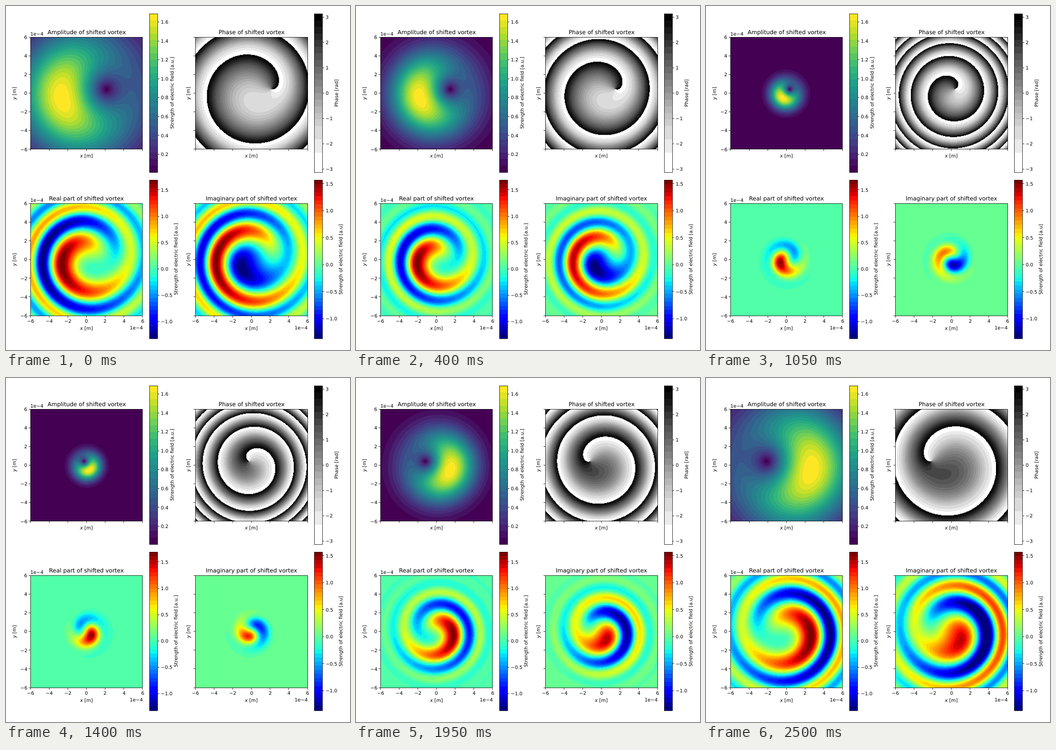
These frames come from a looping animation (720 px wide and 720 px high, 2550 ms). An HTML page with a canvas:

```html
<!DOCTYPE html>
<html lang="en">
<head>
<meta charset="utf-8">
<title>Shifted vortex</title>
<style>
  html, body { margin: 0; width: 100%; height: 100%; overflow: hidden; background: #fff; }
  canvas { display: block; width: 720px; height: 720px; }
</style>
</head>
<body>
<canvas id="stage" width="720" height="720"></canvas>
<script>
const ctx = document.getElementById('stage').getContext('2d');
const FONT = '"DejaVu Sans", sans-serif';
const SIDE = 234.7, UNIT = SIDE / 12;
const BAR_WIDTH = 17, BAR_HEIGHT = 332;
const STEP_MS = 50, STEPS = 51;
const SHIFT = 0.43; // distance of the vortex from the axis, in waist radii
const GRID = 200;   // samples per side of the computed field

const clamp = (v, lo, hi) => Math.min(hi, Math.max(lo, v));

function gradient(hexList) {
  const stops = hexList.split(' ').map(h => [0, 2, 4].map(i => parseInt(h.slice(i, i + 2), 16)));
  return t => {
    const p = t * (stops.length - 1), i = Math.min(stops.length - 2, Math.floor(p));
    return stops[i].map((c, j) => Math.round(c + (stops[i + 1][j] - c) * (p - i)));
  };
}

const viridis = gradient('440154 482878 3e4989 31688e 26828e 1f9e89 35b779 6ece58 b5de2b fde725');
const grays = gradient('ffffff f0f0f0 d9d9d9 bdbdbd 969696 737373 525252 252525 000000');

// The lightest bands share their tones.
function phaseTone(t) {
  const band = Math.round(t * 23);
  if (band < 3) return [255, 255, 255];
  return grays(band < 7 ? (band - (band - 3) % 2 + 0.5) / 23 : t);
}

function jet(t) {
  const ramp = (a, b) => clamp((t - a) / (b - a), 0, 1);
  return [
    Math.min(ramp(0.35, 0.66), 1 - 0.5 * ramp(0.89, 1)),
    Math.min(ramp(0.125, 0.375), 1 - ramp(0.64, 0.91)),
    Math.min(0.5 + 0.5 * ramp(0, 0.11), 1 - ramp(0.34, 0.65))
  ].map(c => Math.round(255 * c));
}

const panels = [
  { left: 51.2, top: 65.2, title: 'Amplitude of shifted vortex', label: 'Strength of electric field [a.u.]', labelX: 351,
    lo: 0.0075, hi: 1.686, bands: 24, map: viridis, ticks: [0.2, 0.4, 0.6, 0.8, 1, 1.2, 1.4, 1.6], digits: 1 },
  { left: 396.4, top: 65.2, title: 'Phase of shifted vortex', label: 'Phase [rad]', labelX: 695,
    lo: -3.135, hi: 3.135, bands: 24, map: phaseTone, ticks: [-3, -2, -1, 0, 1, 2, 3], digits: 0 },
  { left: 51.2, top: 413.4, title: 'Real part of shifted vortex', label: 'Strength of electric field [a.u.]', labelX: 359,
    lo: -1.327, hi: 1.686, bands: 39, map: jet, ticks: [-1, -0.5, 0, 0.5, 1, 1.5], digits: 1 },
  { left: 396.4, top: 413.4, title: 'Imaginary part of shifted vortex', label: 'Strength of electric field [a.u]', labelX: 704,
    lo: -1.372, hi: 1.566, bands: 39, map: jet, ticks: [-1, -0.5, 0, 0.5, 1, 1.5], digits: 1 }
];

for (const p of panels) {
  p.x = Math.floor(p.left);
  p.y = Math.floor(p.top);
  p.width = Math.floor(p.left + SIDE) - p.x + 1;
  p.height = Math.floor(p.top + SIDE) - p.y + 1;
  p.cx = p.left + SIDE / 2;
  p.cy = p.top + SIDE / 2;
  p.barX = p.x + 249;
  p.barY = p.y - 49;
  p.colors = Array.from({ length: p.bands }, (_, i) => p.map(i / (p.bands - 1)));
  p.packed = Uint32Array.from(p.colors, ([r, g, b]) => (255 << 24 | b << 16 | g << 8 | r) >>> 0);
  p.image = ctx.createImageData(p.width, p.height);
  p.pixels = new Uint32Array(p.image.data.buffer);
  p.values = new Float32Array(GRID * GRID);
}

const number = (v, digits = 0) => v.toFixed(digits).replace('-', '\u2212');

// Draws runs of [text, style] side by side, on whole pixels.
function runs(parts, x, y, align, size = 10) {
  const setFont = style => { ctx.font = `${style} ${size}px ${FONT}`; };
  const widths = parts.map(([str, style]) => {
    setFont(style);
    return ctx.measureText(str).width;
  });
  const total = widths.reduce((a, b) => a + b);
  let at = Math.round(x - total * { left: 0, center: 0.5, right: 1 }[align]);
  parts.forEach(([str, style], i) => {
    setFont(style);
    ctx.fillText(str, at, Math.round(y));
    at += widths[i];
  });
}

const text = (str, x, y, align = 'center', size = 10) => runs([[str, 'normal']], x, y, align, size);
const axisName = (letter, x, y) => runs([[letter, 'italic'], [' [m]', 'normal']], x, y, 'center');

function turned(x, y, draw) {
  ctx.save();
  ctx.translate(x, Math.round(y));
  ctx.rotate(-Math.PI / 2);
  draw();
  ctx.restore();
}

function line(x1, y1, x2, y2) {
  ctx.beginPath();
  ctx.moveTo(x1, y1);
  ctx.lineTo(x2, y2);
  ctx.stroke();
}

function drawBar(p) {
  const { barX, barY } = p, bottom = barY + BAR_HEIGHT;
  p.colors.forEach((c, i) => {
    const edge = k => Math.round(bottom - k * BAR_HEIGHT / p.bands);
    ctx.fillStyle = `rgb(${c})`;
    ctx.fillRect(barX, edge(i + 1), BAR_WIDTH, edge(i) - edge(i + 1));
  });
  ctx.fillStyle = '#000';
  ctx.strokeRect(barX + 0.5, barY + 0.5, BAR_WIDTH, BAR_HEIGHT);
  for (const v of p.ticks) {
    const y = bottom + 0.5 - (v - p.lo) / (p.hi - p.lo) * BAR_HEIGHT;
    const snapped = Math.floor(y) + 0.5;
    line(barX + BAR_WIDTH + 0.5, snapped, barX + BAR_WIDTH + 4, snapped);
    text(number(v, p.digits), barX + 24.4, y + 3.7, 'left');
  }
  turned(p.labelX, barY + BAR_HEIGHT / 2, () => text(p.label, 0, 0));
}

function drawFrame(p) {
  const { x, y, cx, cy } = p, isLeft = x < 300, isBottom = y > 300;
  const end = y + p.height - 0.5;
  text(p.title, cx, y - 6, 'center', 12);
  for (let v = -6; v <= 6; v += 2) {
    const tx = cx + v * UNIT, ty = cy - v * UNIT;
    line(Math.floor(tx) + 0.5, end, Math.floor(tx) + 0.5, end + 4);
    line(x - 3.5, Math.floor(ty) + 0.5, x + 0.5, Math.floor(ty) + 0.5);
    if (isBottom) text(number(v), tx, 663);
    if (isLeft) text(number(v), x - 6.6, ty + 3.7, 'right');
  }
  axisName('x', cx, isBottom ? 678 : 317);
  turned(isLeft ? 21 : 385, cy, () => axisName('y', 0, 0));
  if (isLeft) text('1e\u22124', x, y - 3, 'left');
  if (isBottom) text('1e\u22124', p.left + SIDE, 677, 'right');
}

function drawStatic() {
  ctx.fillStyle = '#fff';
  ctx.fillRect(0, 0, 720, 720);
  ctx.strokeStyle = '#000';
  ctx.lineWidth = 0.8;
  ctx.textRendering = 'geometricPrecision';
  for (const p of panels) {
    drawBar(p);
    drawFrame(p);
  }
}

// Off-axis vortex in a Gaussian beam at distance z, in Rayleigh lengths.
function computeField(z) {
  const q2 = 1 + z * z, gouy = Math.atan(z), turn = 2 * Math.PI;
  const [amplitudes, phases, reals, imaginaries] = panels.map(p => p.values);
  for (let row = 0, at = 0; row < GRID; row++) {
    const y = 6 - 12 * row / (GRID - 1);
    for (let col = 0; col < GRID; col++, at++) {
      const x = 12 * col / (GRID - 1) - 6;
      const r2 = (x * x + y * y) / q2;
      const a = 1 - (y - x * z) / (q2 * SHIFT);
      const b = -(x + y * z) / (q2 * SHIFT);
      const amplitude = Math.hypot(a, b) * Math.exp(-r2);
      const angle = Math.atan2(b, a) + gouy - r2 * z;
      amplitudes[at] = amplitude;
      phases[at] = angle - turn * Math.round(angle / turn);
      reals[at] = amplitude * Math.cos(angle);
      imaginaries[at] = amplitude * Math.sin(angle);
    }
  }
}

// Fills the bands between contour levels, interpolating between grid samples.
function drawContours(p) {
  const { values, pixels, packed, bands, lo } = p;
  const gain = bands / (p.hi - lo), scale = (GRID - 1) / SIDE;
  for (let row = 0, at = 0; row < p.height; row++) {
    const v = clamp((p.y + row + 0.5 - p.top) * scale, 0, GRID - 1.001);
    const j = Math.floor(v), fy = v - j;
    for (let col = 0; col < p.width; col++, at++) {
      const u = clamp((p.x + col + 0.5 - p.left) * scale, 0, GRID - 1.001);
      const i = Math.floor(u), fx = u - i, k = j * GRID + i;
      const upper = values[k] + (values[k + 1] - values[k]) * fx;
      const lower = values[k + GRID] + (values[k + GRID + 1] - values[k + GRID]) * fx;
      const value = upper + (lower - upper) * fy;
      pixels[at] = packed[clamp(Math.floor((value - lo) * gain), 0, bands - 1)];
    }
  }
  ctx.putImageData(p.image, p.x, p.y);
  ctx.strokeRect(p.x + 0.5, p.y + 0.5, p.width - 1, p.height - 1);
}

let shown = -1;
const start = performance.now();

function tick() {
  const step = Math.floor((performance.now() - start) / STEP_MS) % STEPS;
  if (step !== shown) {
    shown = step;
    computeField((step - 25) / 5);
    panels.forEach(drawContours);
  }
  requestAnimationFrame(tick);
}

drawStatic();
tick();
</script>
</body>
</html>
```
